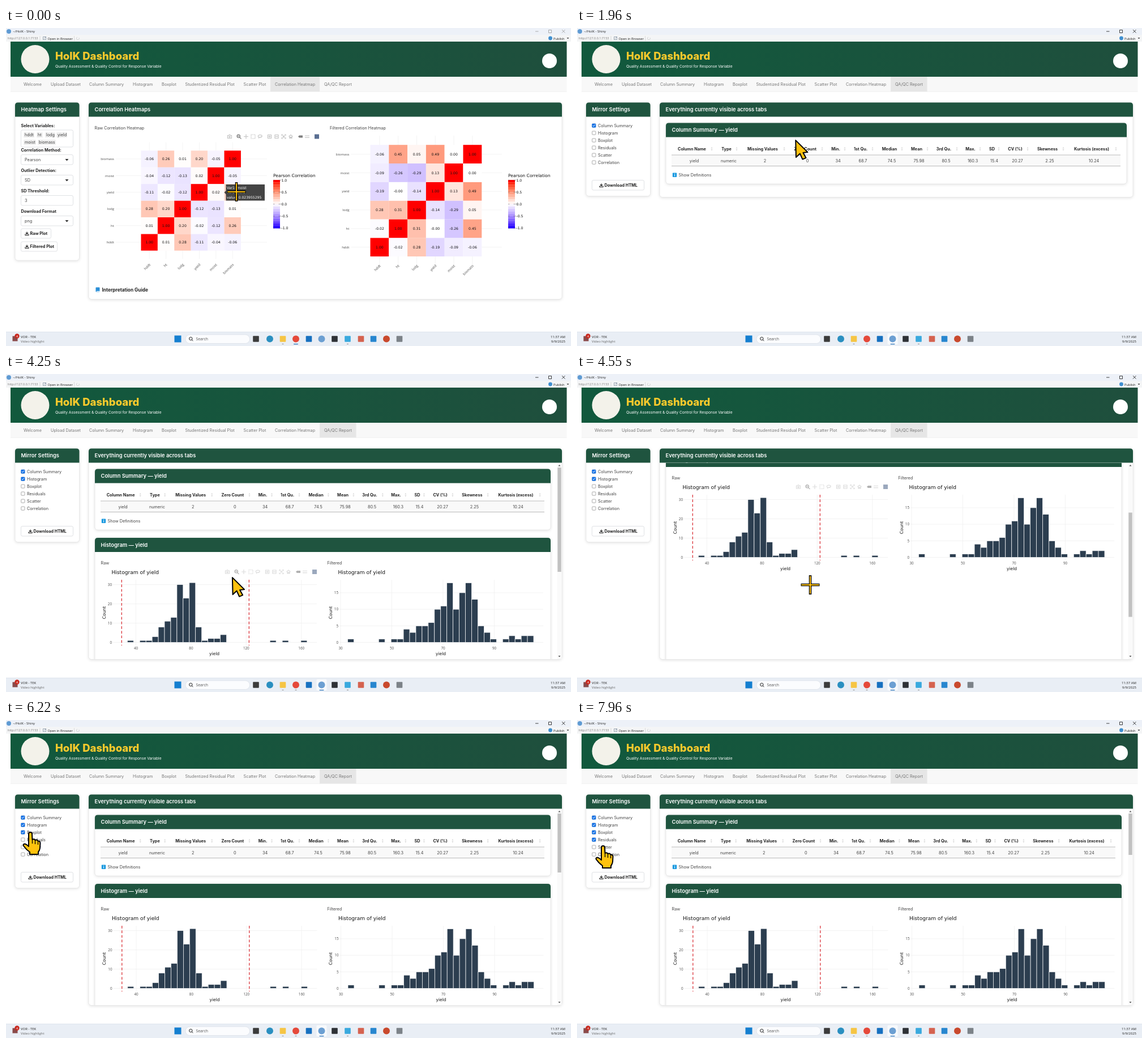
An HTML page that plays this animation: 998x561 px, repeating every 8 s.

```html
<!DOCTYPE html>
<html lang="en">
<head>
<meta charset="utf-8">
<title>Dashboard</title>
<style>
html, body { margin: 0; width: 100%; height: 100%; overflow: hidden; background: #fff; }
svg { display: block; width: 100vw; height: 100vh; }
text { font: 7.28px Inter, sans-serif; fill: #444; white-space: pre; }
.b { font-weight: 700; fill: #222; }
.head { font-size: 9.35px; font-weight: 600; fill: #fff; }
.title { font-size: 18.5px; font-weight: 800; fill: #fcca2c; }
.sub { font-size: 6.65px; fill: #fff; }
.nav { fill: #777; }
.sys { font-size: 6px; font-family: "Open Sans", sans-serif; fill: #222; }
.val { font: 6.1px "DejaVu Sans", sans-serif; fill: #111; }
.tick { font: 6.1px "Open Sans", sans-serif; fill: #4d4d4d; }
.axis { font: 7.6px "DejaVu Sans", sans-serif; fill: #111; }
.plot { font: 9.1px "DejaVu Sans", sans-serif; fill: #111; }
.m { text-anchor: middle; }
.e { text-anchor: end; }
.card { fill: #fff; stroke: #e2e2e2; stroke-width: .7; filter: drop-shadow(0 1.5px 2.5px rgba(0,0,0,.12)); }
.field { fill: #fff; stroke: #d3d6da; stroke-width: .7; }
</style>
</head>
<body>
<script>
const LOOP = 8000;
const rect = (x, y, w, h, fill, extra = '') =>
  `<rect x="${x}" y="${y}" width="${w}" height="${h}" fill="${fill}" ${extra}/>`;
const circle = (x, y, r, fill) => `<circle cx="${x}" cy="${y}" r="${r}" fill="${fill}"/>`;
const text = (x, y, s, cls = '', extra = '') =>
  `<text x="${x}" y="${y}" class="${cls}" ${extra}>${s}</text>`;
const path = (d, stroke, width = 1, extra = '') =>
  `<path d="${d}" fill="none" stroke="${stroke}" stroke-width="${width}" ${extra}/>`;
const fill = (d, color) => `<path d="${d}" fill="${color}"/>`;
const group = (id, body, extra = '') => `<g id="${id}" ${extra}>${body}</g>`;
const each = (list, fn) => list.map(fn).join('');
const field = (x, y, w, h) => rect(x, y, w, h, '#fff', 'class="field" rx="2.5"');

function card(x, y, w, h, title) {
  return rect(x, y, w, h, '#fff', 'class="card" rx="5"') +
    fill(`M${x} ${y + 25}v-20q0-5 5-5h${w - 10}q5 0 5 5v20z`, '#1f543f') +
    text(x + 10.5, y + 15.8, title, 'head');
}

function downloadIcon(x, y) {
  return path(`M${x} ${y - 3}v4M${x - 2} ${y - 1}l2 2.2 2-2.2`, '#222', 1.2) +
    path(`M${x - 3} ${y + 1}v2h6v-2`, '#222', 1.2);
}

// Window frame, page header and taskbar

const tabs = [[31, 'Welcome'], [79, 'Upload Dataset'], [147, 'Column Summary'], [224, 'Histogram'],
  [275, 'Boxplot'], [316.5, 'Studentized Residual Plot'], [419.5, 'Scatter Plot'],
  [475, 'Correlation Heatmap'], [562, 'QA/QC Report']];

const apps = [[441.5, 's', '#3b3b3b'], [466, 'c', '#2a8fc0'], [489, 's', '#f6c544'], [512, 'c', '#e5493a'],
  [535, 's', '#1670c0'], [557.5, 'c', '#6c9fd2'], [580.5, 's', '#2e3136'], [603.5, 's', '#39a9de'],
  [627, 's', '#d5624f'], [649, 's', '#2786cf'], [672, 'c', '#c9492d'], [695, 's', '#7c8288']];

function chrome() {
  return rect(0, 0, 998, 12, '#edf1f8') + rect(0, 12, 998, 12, '#f4f5f6') +
    circle(5, 6, 4, '#5f9bd3') + text(12, 8.3, '~/HolK - Shiny', 'sys') +
    group('buttons', path('M935 6h5.5M958.5 3.5h5v5h-5zM982 3l5.5 5.5m0-5.5l-5.5 5.5', 'currentColor', .8)) +
    text(3, 20.3, 'http://127.0.0.1:7153', 'sys', 'style="fill:#777;font-size:5.5px"') +
    path('M60 14v9M120.500 14v9', '#ccc', .6) + path('M65.500 15.500h5v5h-5zM67 19l4-4', '#8796a5', .8) +
    text(73.5, 20.5, 'Open in Browser', 'sys', 'style="font-size:5.7px"') +
    path('M126 16a2.500 2.500 0 1 0 3 1', '#ccc', .8) +
    circle(961.5, 18, 3.4, '#3f8fd0') + text(967, 20.5, 'Publish', 'sys', 'style="font-size:5.7px"') +
    fill('M990.500 17h4l-2 2.300z', '#444') +
    rect(8, 24, 982.5, 62, 'url(#banner)') +
    circle(51.5, 55, 25, '#f3f2ea') + text(87, 55.5, 'HolK Dashboard', 'title') +
    text(87, 70.3, 'Quality Assessment &amp; Quality Control for Response Variable', 'sub') +
    circle(960, 58, 13, '#fff') +
    rect(8, 86, 982.5, 26.5, '#f8f8f8') + path('M8 112.300h982.500', '#e9e9e9', .6) +
    group('active', rect(0, 86.3, 1, 25.7, '#e6e6e6')) +
    each(tabs, ([x, s]) => text(x, 102, s, 'nav'));
}

function taskbar() {
  return rect(0, 536, 998, 25, '#e9eef5') + path('M0 536.200h998', '#d6dce4', .6) +
    rect(11.5, 543.5, 9, 9, '#8a4a4a') + circle(19.5, 543.5, 4.2, '#c8281e') +
    text(19.5, 545.7, '4', 'sys m', 'style="fill:#fff"') +
    text(26, 547, 'VOR - TEK', 'sys') + text(26, 555.3, 'Video highlight', 'sys', 'style="fill:#666"') +
    rect(297.5, 542.5, 12, 12, '#147fd0') +
    rect(317, 541, 113.5, 15.5, '#fbfcfe', 'rx="7.75" stroke="#d5dbe3" stroke-width=".6"') +
    path('M329 548a2.700 2.700 0 1 0-5.400 0a2.700 2.700 0 1 0 5.400 0M328.300 550l2 2.200', '#222', 1) +
    text(335.5, 551, 'Search', 'sys', 'style="fill:#555;font-size:6.8px"') +
    group('focus', rect(548.5, 538.5, 18, 20, '#f7f9fc', 'rx="2"')) +
    each(apps, ([x, kind, color]) =>
      kind === 'c' ? circle(x, 548.5, 6, color) : rect(x - 5.3, 543.2, 10.6, 10.6, color, 'rx="1"')) +
    each([489, 512, 603.5], x => rect(x - 1.5, 557, 3, 1.1, '#888', 'rx=".5"')) +
    group('mark', rect(-4, 557, 8, 1.2, '#2670b8', 'rx=".6"')) +
    text(988, 547, '11:37 AM', 'sys e') + text(988, 555.3, '9/9/2025', 'sys e');
}

function modebar(x, y) {
  const line = (dx, d, strong) =>
    `<g transform="translate(${x + dx} ${y})">${path(d, strong ? '#777' : '#c4c4c4', 1.2)}</g>`;
  const block = (dx, d) => line(dx, 'M-3-3h6v6h-6z') + line(dx, d);
  return line(0, 'M-3.500-2h2l1-1.200h1l1 1.200h2v5h-7zM1.200.5a1.200 1.200 0 1 0-2.400 0a1.200 1.200 0 1 0 2.400 0') +
    line(16.5, 'M2-.7a2.700 2.700 0 1 0-5.400 0a2.700 2.700 0 1 0 5.400 0M1 1.200l3 3M-2-.7h2.800', true) +
    line(29, 'M-4 0h8M0-4v8') +
    `<g stroke-dasharray="1.500 1">${line(41.5, 'M-3.500-3.500h7v7h-7z')}</g>` +
    line(54, 'M-3 3q2-1 0-2q-2-3 2-4q5 0 4 3q-2 2-5 1') +
    block(70.5, 'M-2 0h4M0-2v4') + block(83, 'M-2 0h4') +
    line(95.5, 'M-3.500-1.500v-2h2M1.500-3.500h2v2M3.500 1.500v2h-2M-1.500 3.500h-2v-2M-2-2l4 4M2-2l-4 4') +
    line(108, 'M-3.500 0l3.500-3 3.500 3M-2 0v3h1.200v-2h1.600v2h1.200v-3') +
    `<g transform="translate(${x + 125} ${y})">${fill('M-4 0l2-2h6v4h-6z', '#808080')}</g>` +
    line(137, 'M-4-1.500h8M-4 1.700h8') + rect(x + 150, y - 4, 8, 8, '#5a6f92');
}

// Heatmaps

const vars = ['hddt', 'ht', 'lodg', 'yield', 'moist', 'biomass'];
const rawPairs = '0.01 0.28 -0.11 -0.04 -0.06 0.20 -0.02 -0.12 0.26 -0.12 -0.13 0.01 0.02 0.20 -0.05';
const filteredPairs = '-0.02 0.28 -0.19 -0.09 -0.06 0.31 -0.00 -0.26 0.45 -0.14 -0.29 0.05 0.13 0.49 0.00';

function heatColor(v) {
  const a = Math.abs(v), q = a ** 4;
  return v < 0 ? `rgb(${255 - 160 * a - 60 * q},${255 - 215 * a - 40 * q},255)`
    : `rgb(255,${255 - 200 * a - 55 * q},${Math.max(0, 255 - 265 * a)})`;
}

function heatmap(x0, y0, size, pairs, labelX, right, barX) {
  const values = pairs.split(' ');
  const lookup = {};
  let next = 0, out = '';
  vars.forEach((_, i) => {
    lookup[i + '' + i] = '1.00';
    for (let j = i + 1; j < 6; j++) lookup[i + '' + j] = lookup[j + '' + i] = values[next++];
  });
  const top = y0 - size * .5, bottom = y0 + size * 6.5;
  vars.forEach((name, i) => {
    const cx = x0 + size * (i + .5), cy = y0 + size * (5.5 - i);
    out += path(`M${cx} ${top}V${bottom}M${labelX + 3} ${cy}H${right}`, '#efefef', .7) +
      text(labelX, cy + 2.2, name, 'tick e') +
      text(0, 0, name, 'tick e', `transform="translate(${cx + 2.5} ${bottom - 4.500 + (size > 30 ? 5 : 15)}) rotate(-45)"`);
  });
  vars.forEach((_, i) => vars.forEach((_, j) => {
    const v = lookup[i + '' + j], x = x0 + size * j, y = y0 + size * (5 - i);
    out += rect(x, y, size, size, heatColor(+v)) + text(x + size / 2, y + size / 2 + 2.2, v, 'val m');
  }));
  for (let k = 0; k < 20; k++) out += rect(barX, 268 + k * 4.27, 12, 4.4, heatColor(1 - k / 9.5));
  out += text(barX, 262.5, 'Pearson Correlation', 'axis');
  return out + each(['1.0', '0.5', '0.0', '-0.5', '-1.0'], (s, i) => {
    const y = 268.3 + i * 21.2;
    return path(`M${barX} ${y}h2.500M${barX + 9.5} ${y}h5`, '#555', .5) + text(barX + 14.5, y + 2.2, s, 'val');
  });
}

function heatPage() {
  const select = (label, y, value, caret) => text(26.5, y, label, 'b') + field(26.5, y + 5.5, 92, 17.5) +
    text(33, y + 17, value) + (caret ? fill(`M104.500 ${y + 13}h6l-3 3.500z`, '#333') : '');
  const tag = (x, y, s, w) => rect(x - 2, y - 7, w, 9.5, '#efefef', 'rx="1.5"') + text(x, y, s);
  const button = (y, w, s) => field(26.5, y, w, 17) + downloadIcon(37, y + 8.5) + text(42.5, y + 11.2, s, 'b');
  return card(16, 131.5, 113.5, 278.5, 'Heatmap Settings') +
    text(26.5, 174.5, 'Select Variables:', 'b') + field(26.5, 180, 92, 30) +
    tag(33, 191, 'hddt', 19) + tag(56, 191, 'ht', 11) + tag(71, 191, 'lodg', 18) + tag(91, 191, 'yield', 19) +
    tag(33, 204, 'moist', 22) + tag(58, 204, 'biomass', 32) +
    select('Correlation Method:', 218, 'Pearson', true) + select('Outlier Detection:', 254, 'SD', true) +
    select('SD Threshold:', 290, '3') + select('Download Format', 326, 'png', true) +
    button(354, 53, 'Raw Plot') + button(377, 64, 'Filtered Plot') +
    card(146, 131.5, 836, 347, 'Correlation Heatmaps') +
    text(156.5, 178.7, 'Raw Correlation Heatmap') + text(572, 178.7, 'Filtered Correlation Heatmap') +
    heatmap(238.5, 216.3, 29.4, rawPairs, 191, 461, 472) +
    heatmap(643.5, 206.2, 32.8, filteredPairs, 606.5, 876, 887) +
    group('heatBar', modebar(395, 191.5)) +
    rect(158.5, 457.5, 7, 8, '#2a8fd8', 'rx="1"') + rect(160, 464, 5.5, 1, '#fff') +
    text(169.5, 464.5, 'Interpretation Guide', 'b', 'style="font-size:8.3px"') +
    group('tip', fill('M385.500 290l3-3v-11h68.500v28.500h-68.500v-11z', '#444') +
      each(['Var1: moist', 'Var2: yield', 'value: 0.023955295'], (s, i) =>
        text(390, 283.5 + i * 8.8, s, 'val', 'style="fill:#fff"')));
}

// Report

const columns = [[203, 'Column Name', 'yield', 238], [264, 'Type', 'numeric', 282], [328, 'Missing Values', '2', 366],
  [403, 'Zero Count', '0', 433], [457, 'Min.', '34', 473], [501, '1st Qu.', '68.7', 522], [552, 'Median', '74.5', 574],
  [600, 'Mean', '75.98', 619], [648, '3rd Qu.', '80.5', 671], [695, 'Max.', '160.3', 712], [733, 'SD', '15.4', 745],
  [774, 'CV (%)', '20.27', 796], [831, 'Skewness', '2.25', 859], [909, 'Kurtosis (excess)', '10.24', 952]];

function summary(width) {
  const k = (width - 21) / 793, at = x => 167 + (x - 167) * k, end = at(960);
  return card(157, 167.5, width, 107.5, 'Column Summary — yield') +
    rect(167, 224, end - 167, 19.5, '#f9f9f9') + path(`M167 224H${end}M167 243.500H${end}`, '#aaa', .8) +
    each(columns, ([x, name, value, sort]) => text(at(x), 216, name, 'b m') +
      text(at(x + 4), 236.5, value, 'm') +
      fill(`M${at(sort) - 1.5} 212.500h3l-1.500-2.500zM${at(sort) - 1.5} 214h3l-1.500 2.500z`, '#d5d5d5')) +
    rect(168.8, 255.5, 7.4, 7.4, '#1e9be0', 'rx="1"') + path('M172.500 258.500v3M172.500 256.700v1', '#fff', 1) +
    text(179.5, 262, 'Show Definitions');
}

function histogram(c) {
  const grid = each(c.xTicks, (n, i) => {
    const x = c.x0 + i * c.dx;
    return path(`M${x} 363V479`, '#eee', .7) + text(x, 485.8, n, 'tick m', 'style="font-size:6.3px"');
  }) + each([0, 1, 2, 3], i => {
    const y = 473.5 - i * c.dy;
    return path(`M${c.left} ${y}H${c.right}`, '#eee', .7) +
      text(c.left - 2, y + 2.3, i * c.step, 'tick e', 'style="font-size:6.3px"');
  });
  const bars = each(c.counts, (n, i) => n ? rect(c.start + i * 10.95, 473.5 - n * c.dy / c.step, 10.95,
    n * c.dy / c.step, '#2c3e50', 'stroke="#fff" stroke-width=".7"') : '');
  return grid + bars + text(c.left - 2.5, 352.8, 'Histogram of yield', 'plot') +
    text((c.left + c.right) / 2 - 1, 496.3, 'yield', 'axis m') +
    text(0, 0, 'Count', 'axis m', `transform="translate(${c.left - 13.5} 421) rotate(-90)"`);
}

const rawHist = { left: 189, right: 549, x0: 229.5, dx: 97.4, xTicks: [40, 80, 120, 160], dy: 34, step: 10, start: 214.3,
  counts: [1, 0, 1, 1, 3, 8, 11, 13, 30, 23, 31, 8, 1, 2, 2, 4, 0, 0, 0, 0, 0, 0, 0, 1, 0, 1, 0, 0, 1] };
const filteredHist = { left: 589, right: 949, x0: 591, dx: 90.5, xTicks: [30, 50, 70, 90], dy: 29.2, step: 5, start: 603.5,
  counts: [1, 0, 0, 0, 0, 1, 0, 1, 1, 4, 3, 5, 5, 6, 10, 11, 18, 10, 15, 18, 13, 5, 3, 1, 0, 1, 2, 1, 2, 2] };

function reportPage() {
  const names = ['Column Summary', 'Histogram', 'Boxplot', 'Residuals', 'Scatter', 'Correlation'];
  return card(16, 131.5, 113.5, 165, 'Mirror Settings') +
    each(names, (s, i) => {
      const y = 172 + i * 13;
      return rect(26.8, y - 3, 6.2, 6.2, '#fff', 'rx="1" stroke="#888" stroke-width=".7"') +
        text(37, y + 2.6, s) +
        group('check' + i, rect(26.5, y - 3.3, 6.8, 6.8, '#0f70e8', 'rx="1"') +
          path(`M28 ${y}l1.400 1.600 2.500-3.200`, '#fff', 1));
    }) +
    field(26.5, 268.5, 92, 17.5) + downloadIcon(43, 277.5) + text(48.5, 280, 'Download HTML', 'b') +
    group('short', card(146, 131.5, 836, 167, 'Everything currently visible across tabs') + summary(814)) +
    group('long', card(146, 131.5, 836, 372, 'Everything currently visible across tabs') +
      `<g clip-path="url(#view)">` + group('content', summary(805) +
        card(157, 289, 805, 470, 'Histogram — yield') + text(167.5, 336, 'Raw') + text(567.5, 336, 'Filtered') +
        group('plots', histogram(rawHist) + histogram(filteredHist) +
          path('M204.300 363V479M429.300 363V479', '#d8232a', 1.2, 'stroke-dasharray="4.700 3.500"') +
          group('histBar', modebar(391, 349), 'opacity=".6"'))) + '</g>' +
      rect(973.5, 157, 7.8, 345.5, '#fafafa') +
      fill('M975.500 162.500h4l-2-2.500zM975.500 497h4l-2 2.500z', '#555') +
      `<rect id="thumb" x="974.300" y="165" width="6.400" height="184" fill="#c1c1c1"/>`);
}

// Pointers

const handShape = 'M-3 2Q-3-1 0-1Q3-1 3 2L3.500 12Q7 10 8.500 13Q12 11.500 13.500 14.500Q17 14 17.500 18' +
  'L17 27Q16.500 31 14 34V38H-1V34Q-7 30-12 23Q-13.500 20-10 19.500Q-7 20-3 24Z';
const pointerStyle = 'fill="#ffc20e" stroke="#000" stroke-width="2" stroke-linejoin="round"';
const pointers = group('arrow', `<path d="M.8 1L22 22 14 23 19 32 13 34.500 8.500 24.500 1.500 31Z" ${pointerStyle}/>`) +
  group('hand', `<path d="${handShape}" ${pointerStyle}/>` + path('M3.500 12v7M8.500 13v7M13.500 15v6', '#000', 1.3)) +
  group('cross', path('M-16.500 0h33M0-17v34', '#000', 4.5) + path('M-15.500 0h31M0-15.500v31', '#ffc20e', 2));

document.body.innerHTML = `<svg viewBox="0 0 998 561" preserveAspectRatio="none">
<defs><linearGradient id="banner"><stop stop-color="#11593d"/><stop offset="1" stop-color="#1f4f3d"/></linearGradient>
<clipPath id="view"><rect x="146.500" y="156.500" width="827" height="346.500"/></clipPath></defs>
${rect(0, 0, 998, 561, '#fff')}${chrome()}${group('heat', heatPage())}${group('report', reportPage())}
${taskbar()}${group('pointer', pointers)}</svg>`;

const el = id => document.getElementById(id);
const show = (id, on) => { el(id).style.display = on ? '' : 'none'; };
const move = (id, x, y) => el(id).setAttribute('transform', `translate(${x} ${y})`);

const track = [[0, 407, 289], [70, 407, 289], [420, 530, 200], [650, 601, 128], [840, 586, 96], [1660, 586, 96],
  [1960, 386, 197], [2180, 260, 216], [2520, 125, 231], [2760, 44, 198], [2880, 44, 198], [3040, 52, 194],
  [3220, 40, 184], [3720, 40, 184], [4010, 250, 300], [4250, 399, 358], [4400, 412, 372], [4640, 412, 372],
  [5110, 156, 288], [5410, 96, 235], [5730, 42, 197], [5840, 42, 197], [5900, 43, 199], [6320, 43, 199],
  [6690, 45, 211], [7420, 45, 211], [7960, 46, 223], [LOOP, 46, 223]];
const scroll = [[0, 0], [4320, 0], [4550, 150], [4640, 150], [4950, 0], [LOOP, 0]];

function sample(keys, t) {
  const i = Math.max(1, keys.findIndex(k => k[0] > t));
  const a = keys[i - 1], b = keys[i], p = (t - a[0]) / (b[0] - a[0]);
  return a.slice(1).map((v, n) => v + (b[n + 1] - v) * p);
}

function draw(t) {
  const report = t >= 1240, focused = t >= 1100;
  show('heat', !report);
  show('report', report);
  el('active').firstChild.setAttribute('width', report ? 64.5 : 87);
  move('active', report ? 554 : 467, 0);
  el('buttons').style.color = focused ? '#111' : '#999';
  show('focus', focused);
  move('mark', focused ? 557.5 : 512, 0);

  show('short', t < 3450);
  show('long', t >= 3450);
  show('plots', t >= 3640);
  [0, 3370, 5900, 6850, LOOP, LOOP].forEach((start, i) => show('check' + i, t >= start));
  const [offset] = sample(scroll, t);
  move('content', 0, -offset);
  move('plots', t >= 6150 ? .5 : 0, 0);
  el('thumb').setAttribute('y', 165 + offset * .53);
  el('thumb').setAttribute('height', t < 6150 ? 184 : t < 7420 ? 104 : 73);
  show('histBar', t >= 4160 && t < 6150);

  const [x, y] = sample(track, t);
  const overHeat = !report && y > 190 && x < 465;
  const overHist = t > 3640 && x > 189 && x < 549 && y > 363;
  const pose = overHeat || overHist ? 'cross' : y < 112 || x < 72 ? 'hand' : 'arrow';
  ['arrow', 'hand', 'cross'].forEach(name => show(name, name === pose));
  show('tip', t < 100);
  show('heatBar', t < 480);
  move('pointer', x, y);
}

const start = performance.now();
function tick() {
  draw((performance.now() - start) % LOOP);
  requestAnimationFrame(tick);
}
tick();
</script>
</body>
</html>
```
